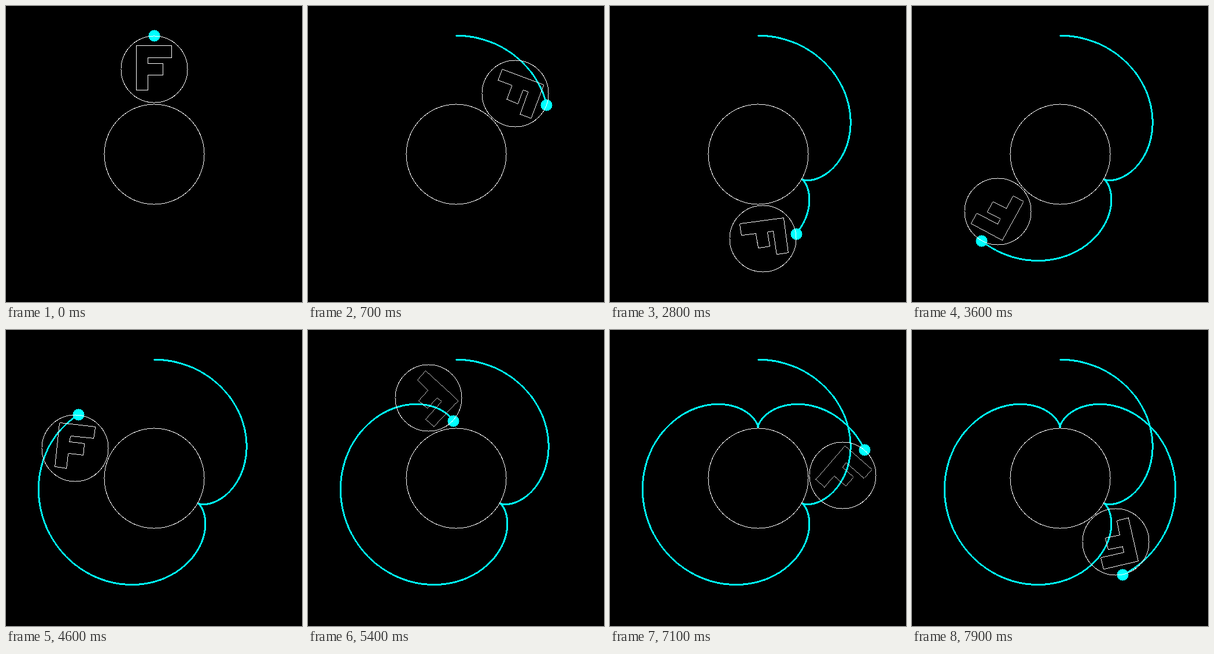
An HTML page that plays this animation: 512x512 px, repeating every 8000 ms.

```html
<!DOCTYPE html>
<html lang="en">
<head>
<meta charset="utf-8">
<title>Epicycloid</title>
<style>
  html, body { margin: 0; width: 100%; height: 100%; overflow: hidden; background: #000; }
  svg { display: block; width: 100vw; height: 100vh; }
  svg * { shape-rendering: crispEdges; }
  .thin { fill: none; stroke: #fff; stroke-width: 1; }
  #trace, #dot { fill: #0ff; }
</style>
</head>
<body>
<svg viewBox="0 0 512 512">
  <path id="trace"/>
  <circle id="dot" r="10.02"/>
  <circle class="thin" cx="256.5" cy="256.5" r="86.52"/>
  <circle id="wheel" class="thin" r="57.52"/>
  <polygon id="letter" class="thin"/>
</svg>
<script>
  const LOOP = 8000, STEP = 100, STEPS_PER_TURN = 57, SUBSTEPS = 40;
  const MID = 256, UNIT = 5.12;
  const ROLL = 40 * UNIT / 3.5;   // rolling radius; the fixed circle is 1.5 times as large
  const ORBIT = 2.5 * ROLL;
  const LETTER = [[-6, -8], [6, -8], [6, -4], [-2, -4], [-2, -2],
                  [3, -2], [3, 2], [-2, 2], [-2, 7], [-6, 7]];

  const byId = id => document.getElementById(id);
  const trace = byId('trace'), dot = byId('dot'), wheel = byId('wheel'), letter = byId('letter');
  const snap = v => Math.floor(v + 1e-6);

  function pose(step) {
    const turn = step * 2 * Math.PI / STEPS_PER_TURN;
    const spin = 2.5 * turn;
    const x = MID + ORBIT * Math.sin(turn);
    const y = MID - ORBIT * Math.cos(turn);
    return { x, y, spin, px: x + ROLL * Math.sin(spin), py: y - ROLL * Math.cos(spin) };
  }

  function place(circle, x, y) {
    circle.setAttribute('cx', snap(x) + 0.5);
    circle.setAttribute('cy', snap(y) + 0.5);
  }

  // The pen is a small plus, stamped on every pixel the curve passes.
  const stamp = (x, y) => `M${x - 1} ${y}h3v1h-3zM${x} ${y - 1}h1v3h-1z`;

  function tracePath(step) {
    const stamps = new Set();
    for (let i = 0; step && i <= step * SUBSTEPS; i++) {
      const { px, py } = pose(i / SUBSTEPS);
      stamps.add(stamp(snap(px), snap(py)));
    }
    return [...stamps].join('');
  }

  function drawLetter({ x, y, spin }) {
    const c = Math.cos(spin), s = Math.sin(spin);
    const points = LETTER.map(([u, v]) =>
      (snap(x + (u * c - v * s) * UNIT) + 0.5) + ',' + (snap(y + (u * s + v * c) * UNIT) + 0.5));
    letter.setAttribute('points', points.join(' '));
    // Slanted lines stay one pixel wide across their shorter axis.
    letter.style.strokeWidth = Math.max(Math.abs(c), Math.abs(s));
  }

  function draw(step) {
    const p = pose(step);
    place(wheel, p.x, p.y);
    place(dot, p.px, p.py);
    drawLetter(p);
    trace.setAttribute('d', tracePath(step));
  }

  let start = null, shown = 0;
  function tick(now) {
    if (start === null) start = now;
    const step = Math.floor((now - start) % LOOP / STEP);
    if (step !== shown) draw(shown = step);
    requestAnimationFrame(tick);
  }
  draw(0);
  requestAnimationFrame(tick);
</script>
</body>
</html>
```
